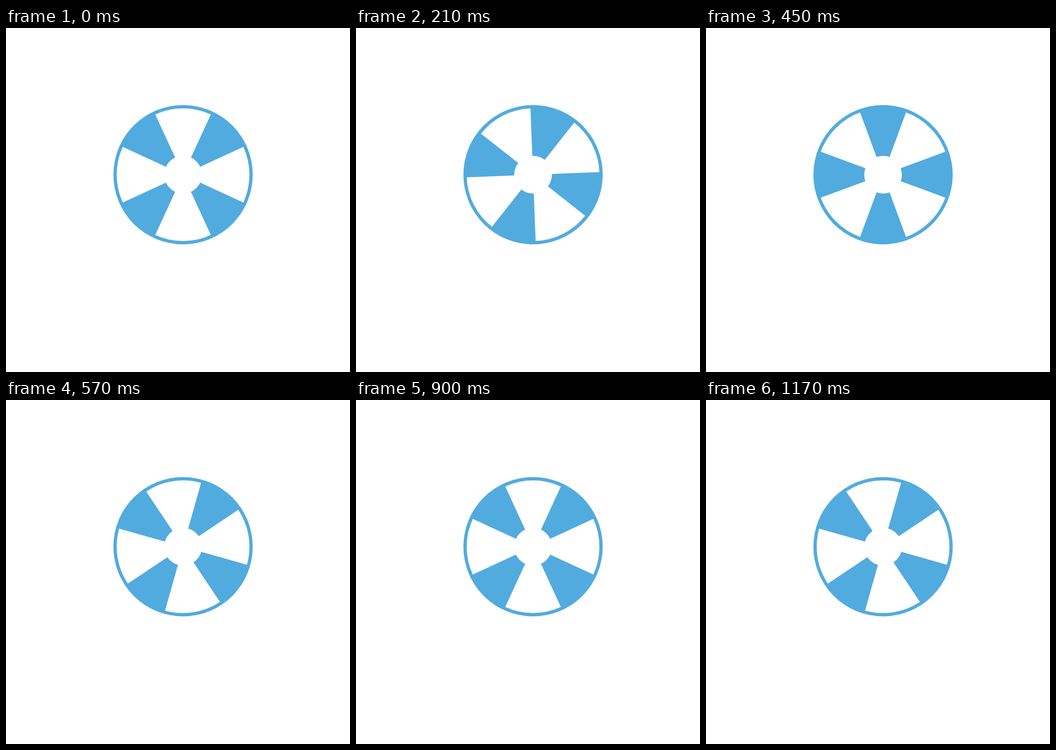
An HTML page for the animation above (1200 ms loop, 748 by 748 pixels).

```html
<!DOCTYPE html>
<html lang="en">
<head>
<meta charset="utf-8">
<title>Spinning wheel</title>
<style>
  html, body { margin: 0; width: 100%; height: 100%; overflow: hidden; background: #fff; }
  svg { display: block; width: 100vw; height: 100vh; }
</style>
</head>
<body>
<svg viewBox="0 0 748 748">
  <g transform="translate(385 319)">
    <circle r="151.5" fill="#52abde"/>
    <path id="gaps" fill="#fff"/>
    <circle r="41" fill="#fff"/>
  </g>
</svg>
<script>
const LOOP = 1200, STEP = 30, TURN = 360;
const RIM = 144.3, HALF_GAP = 24.75;
const gaps = document.getElementById('gaps');

function point(deg) {
  const a = deg * Math.PI / 180;
  return (RIM * Math.sin(a)).toFixed(3) + ' ' + (-RIM * Math.cos(a)).toFixed(3);
}

function sector(mid) {
  return `M0 0L${point(mid - HALF_GAP)}A${RIM} ${RIM} 0 0 1 ${point(mid + HALF_GAP)}Z`;
}

gaps.setAttribute('d', [0, 90, 180, 270].map(sector).join(''));

// One clockwise turn per loop, in even steps
function draw(ms) {
  const t = Math.floor((ms % LOOP) / STEP) * STEP;
  gaps.setAttribute('transform', `rotate(${t / LOOP * TURN})`);
}

let start;
function tick(now) {
  start ??= now;
  draw(Math.max(0, now - start));
  requestAnimationFrame(tick);
}
draw(0);
requestAnimationFrame(tick);
</script>
</body>
</html>
```
